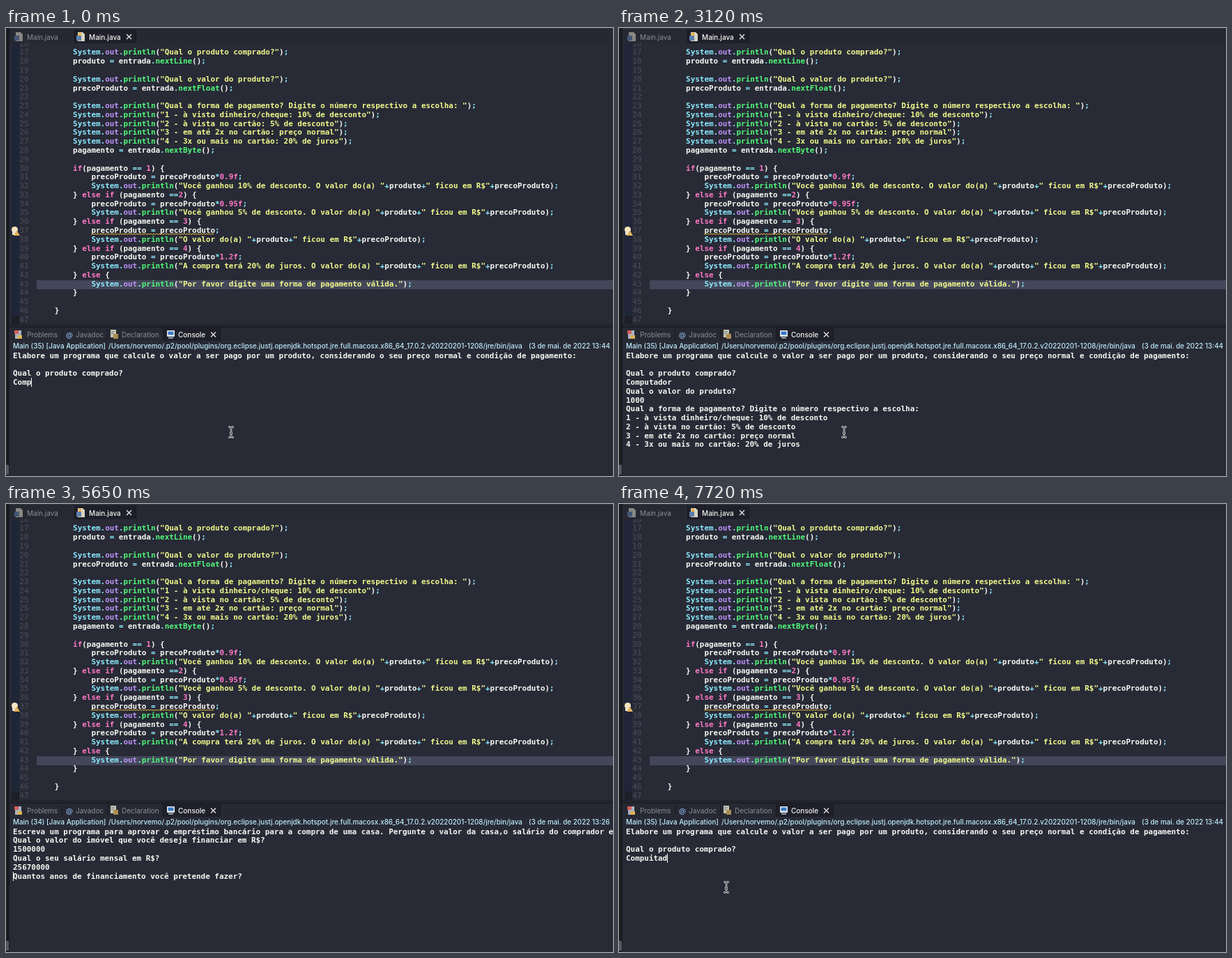
An HTML page that plays this animation: 871 by 643 pixels, repeating every 8000 ms.

```html
<!DOCTYPE html>
<html lang="pt-BR">
<head>
<meta charset="utf-8">
<title>Console</title>
<style>
  html, body { margin: 0; width: 100%; height: 100%; overflow: hidden; background: #282a36; }
  #stage { position: relative; width: 871px; height: 643px; overflow: hidden; }
  #stage > * { position: absolute; }
  svg { left: 0; top: 0; }
  svg text { font: 10px Inter, sans-serif; white-space: pre; }
  .dim { fill: #8b8d98; }
  .lit { fill: #f4f4f4; font-weight: 500; }
  #code, #out, #caret { font: bold 10.93px "DejaVu Sans Mono", monospace; line-height: 12.78px; color: #f8f8f2; white-space: pre; }
  #code { left: 0; top: 22px; width: 871px; height: 403px; overflow: hidden; }
  #code div { position: absolute; left: 43.5px; }
  #code .num { left: 0; width: 32.5px; text-align: right; font-weight: normal; color: #4b4d5a; }
  #code .now { left: 44px; width: 827px; height: 13px; background: #44475a; }
  .str { color: #f1fa8c; }
  .key, .lit-num { color: #ff79c6; }
  .type, .op { color: #8be9fd; }
  .field { color: #bd93f9; }
  .call { color: #50fa7b; }
  #out { left: 10px; top: 464.6px; }
  #caret { left: 10px; top: 464px; height: 13px; }
  #caret i { position: absolute; width: 1px; height: 13px; background: #f8f8f2; }
  .ui { font: 500 9.85px/12px Inter, sans-serif; white-space: pre; top: 450px; color: #bdeefb; }
  #ended { left: 10px; }
  #run { left: 0; width: 1200px; height: 12px; }
  #run span { position: absolute; top: 0; }
</style>
</head>
<body>
<div id="stage">
  <svg width="871" height="643">
    <rect width="871" height="22" fill="#262832"/>
    <rect width="871" height="1" fill="#31333d"/>
    <rect x="98" y="2" width="89" height="20" fill="#1e1f28"/>
    <path d="M98.5 2V22M186.5 2V22" stroke="#17181e"/>
    <rect x="8" y="22" width="11" height="391" fill="#202538"/>
    <rect x="8" y="413" width="11" height="12" fill="#1d1f28"/>
    <rect y="425" width="871" height="5" fill="#22242d"/>
    <path d="M5 429.5H871" stroke="#191a21"/>
    <rect x="8" y="430" width="863" height="19" fill="#262832"/>
    <rect x="226" y="430" width="82" height="19" fill="#1e1f28"/>
    <path d="M225.5 430V449M307.5 430V449M80.5 432V447M145.5 432V447" stroke="#191a21"/>
    <rect width="5" height="643" fill="#1b1c22"/>
    <rect y="627" width="4" height="14" fill="#55575f"/>

    <g id="file">
      <path d="M14 6h7l3 3v10h-10z" fill="#d9d5c4"/>
      <rect x="12" y="11" width="7" height="7" fill="#5b7fae"/>
    </g>
    <use href="#file" x="89"/>
    <rect x="11" y="5" width="15" height="15" fill="#262832" opacity=".45"/>
    <rect x="104" y="7" width="4" height="4" fill="#e8b13c"/>
    <text x="30" y="16.5" class="dim">Main.java</text>
    <text x="119" y="16.5" class="lit">Main.java</text>

    <path d="M13 434h9v12h-9z" fill="#a9b3c4"/>
    <path d="M12 434h6v5h-6z" fill="#d4605c"/>
    <path d="M16 441h7v5h-7z" fill="#d9b05a"/>
    <text x="30" y="444" class="dim">Problems</text>
    <text x="86" y="443.5" style="fill:#7fa6d6;font-weight:600">@</text>
    <text x="100" y="444" class="dim">Javadoc</text>
    <path d="M150 433h8v11h-8z" fill="#c9c4ae"/>
    <path d="M154 439h7v7h-7z" fill="#a98b52"/>
    <path d="M151 436h5M151 438.500h3" stroke="#5f7896"/>
    <text x="166" y="444" class="dim">Declaration</text>
    <rect x="231" y="434" width="11" height="9" rx="1" fill="#e6eefa"/>
    <rect x="232.500" y="435.500" width="8" height="5" fill="#3a78c4"/>
    <rect x="233" y="444" width="7" height="1.500" fill="#b9c4d4"/>
    <text x="247" y="444" class="lit">Console</text>
    <path d="M173 9l7 7m0-7l-7 7M294 436.500l7 7m0-7l-7 7" stroke="#e8e8e8" stroke-width="1.300"/>
  </svg>

  <div id="code"></div>

  <svg width="871" height="643">
    <circle cx="12.500" cy="289.500" r="4.500" fill="#f6e6bd"/>
    <rect x="9" y="291" width="7" height="6" fill="#ece3cc"/>
    <path d="M15.500 290.500l4.500 7.500h-9z" fill="#e3b25c"/>
    <path id="wave" fill="none" stroke="#e5b73b"/>
  </svg>

  <div id="ended" class="ui">&lt;terminated&gt;</div>
  <div id="run" class="ui">
    <span id="app" style="left:10px"></span>
    <span style="left:147px">/Users/norvemo/.p2/pool/plugins/org.eclipse.justj.openjdk.hotspot.jre.full.macosx.x86_64_17.0.2.v20220201-1208/jre/bin/java</span>
    <span id="date" style="left:750px"></span>
  </div>
  <div id="out"></div>
  <div id="caret"><i></i></div>

  <svg id="mouse" width="10" height="18" viewBox="0 0 10 18">
    <g fill="none">
      <path d="M1.500 1.500H3L5 3L7 1.500H8.500M5 3V15M1.500 16.500H3L5 15L7 16.500H8.500M3 10.500H7" stroke="#f4f4f4" stroke-width="2.500"/>
      <path d="M2 1.500H3L5 3L7 1.500H8M5 3V15M2 16.500H3L5 15L7 16.500H8M3.500 10.500H6.500" stroke="#15161b" stroke-width=".9"/>
    </g>
  </svg>
</div>

<script>
const $ = id => document.getElementById(id);
const PITCH = 12.78, LOOP = 8000;

const menu = [
  'Qual a forma de pagamento? Digite o número respectivo a escolha: ',
  '1 - à vista dinheiro/cheque: 10% de desconto',
  '2 - à vista no cartão: 5% de desconto',
  '3 - em até 2x no cartão: preço normal',
  '4 - 3x ou mais no cartão: 20% de juros'
];
const say = s => `System.out.println(${s});`;
const price = s => say(`"${s}O valor do(a) "+produto+" ficou em R$"+precoProduto`);

// Editor lines from number 16: [indent, text]
const source = [
  [8, ''],
  [8, say('"Qual o produto comprado?"')],
  [8, 'produto = entrada.nextLine();'],
  [8, ''],
  [8, say('"Qual o valor do produto?"')],
  [8, 'precoProduto = entrada.nextFloat();'],
  [8, ''],
  ...menu.map(s => [8, say(`"${s}"`)]),
  [8, 'pagamento = entrada.nextByte();'],
  [8, ''],
  [8, 'if(pagamento == 1) {'],
  [12, 'precoProduto = precoProduto*0.9f;'],
  [12, price('Você ganhou 10% de desconto. ')],
  [8, '} else if (pagamento ==2) {'],
  [12, 'precoProduto = precoProduto*0.95f;'],
  [12, price('Você ganhou 5% de desconto. ')],
  [8, '} else if (pagamento == 3) {'],
  [12, 'precoProduto = precoProduto;'],
  [12, price('')],
  [8, '} else if (pagamento == 4) {'],
  [12, 'precoProduto = precoProduto*1.2f;'],
  [12, price('A compra terá 20% de juros. ')],
  [8, '} else {'],
  [12, say('"Por favor digite uma forma de pagamento válida."')],
  [8, '}'],
  [8, ''],
  [4, '}'],
  [8, '']
];

const kinds = ['str', 'key', 'type', 'field', 'call', 'lit-num', 'op'];
const token = /("[^"]*")|\b(if|else)\b|\b(System)\b|\b(out)\b|\b(println|next\w+)|(\d[\d.]*f?)|([=+*.;]+)/g;
const paint = s => s.replace(token, (m, ...g) =>
  `<span class="${kinds[g.findIndex((v, i) => i < 7 && v)]}">${m}</span>`);

$('code').innerHTML = source.map(([indent, s], i) => {
  const n = 16 + i, top = `style="top:${(7.4 + PITCH * (n - 17)).toFixed(2)}px"`;
  return (n === 43 ? `<div class="now" ${top}></div>` : '') +
    `<div class="num" ${top}>${n}</div><div ${top}>${' '.repeat(indent)}${paint(s)}</div>`;
}).join('');

let wave = 'M122 296.5';
for (let x = 124; x <= 299; x += 2) wave += `L${x} ${x % 4 ? 296.5 : 295}`;
$('wave').setAttribute('d', wave);

// Console contents
const start = ['Elabore um programa que calcule o valor a ser pago por um produto, considerando o seu preço normal e condição de pagamento:',
  '', 'Qual o produto comprado?'];
const named = [...start, 'Computador', 'Qual o valor do produto?'];
const priced = [...named, '1000', ...menu];
const done = [...priced, '1', 'Você ganhou 10% de desconto. O valor do(a) Computador ficou em R$900.0'];
const loan = [
  'Escreva um programa para aprovar o empréstimo bancário para a compra de uma casa. Pergunte o valor da casa,o salário do comprador e em quantos anos',
  'Qual o valor do imóvel que você deseja financiar em R$?', '1500000',
  'Qual o seu salário mensal em R$?', '25670000',
  'Quantos anos de financiamento você pretende fazer?'
];

const steps = [];
let now = { lines: start, caret: null, ended: false, app: 35, mouse: [323, 580] };
const at = (t, change) => steps.push([t, now = { ...now, ...change }]);
const type = (t, base, text) =>
  at(t, { lines: [...base, text], caret: [base.length, text.length] });
const key = (t0, i) => Math.round((t0 + i * 147.5) / 10) * 10;

type(0, start, 'Comp');
for (let i = 0; i < 6; i++) type(key(150, i), start, 'Computador'.slice(0, 5 + i));
at(1030, { lines: named, caret: [4, 0] });
at(1630, { caret: null });
for (let i = 1; i < 4; i++) type(key(1630, i), named, '1000'.slice(0, i));
at(2220, { lines: [...named, '1000'], caret: null });
at(2520, { lines: priced, caret: [6, 0] });
at(3120, { caret: null });
type(3270, priced, '1');
at(3560, { lines: done, caret: [12, 0], ended: true });
at(4160, { caret: null });
at(4460, { mouse: [316, 530] });
at(4610, { mouse: [298, 374] });
at(4750, { mouse: null, caret: [12, 0] });
at(5200, { caret: null });
at(5650, { lines: loan, caret: [5, 0], ended: false, app: 34 });
at(5790, { lines: start, caret: [0, 0], app: 35 });
at(5940, { mouse: [116, 31] });
at(6090, { mouse: [130, 260] });
at(6230, { mouse: [148, 490] });
at(6380, { mouse: [154, 550], caret: null });
[1, 2, 3, 4, 5, 7, 9].forEach((n, i) => type(key(6830, i), start, 'Compuitad'.slice(0, n)));

let shown = null;
function draw(s) {
  $('out').textContent = s.lines.join('\n');
  $('ended').hidden = !s.ended;
  $('run').style.left = s.ended ? '68px' : '0';
  $('app').textContent = `Main (${s.app}) [Java Application]`;
  $('date').textContent = `(3 de mai. de 2022 13:${s.app === 35 ? '44' : '26'}`;
  const bar = $('caret').firstChild;
  bar.hidden = !s.caret;
  if (s.caret) {
    bar.style.top = s.caret[0] * PITCH + 'px';
    bar.style.left = s.caret[1] + 'ch';
  }
  const m = $('mouse').style;
  m.display = s.mouse ? '' : 'none';
  if (s.mouse) {
    m.left = s.mouse[0] - 5 + 'px';
    m.top = s.mouse[1] - 9 + 'px';
  }
}

function tick() {
  const t = performance.now() % LOOP;
  const state = steps.findLast(([time]) => time <= t)[1];
  if (state !== shown) draw(shown = state);
  requestAnimationFrame(tick);
}
tick();
</script>
</body>
</html>
```
